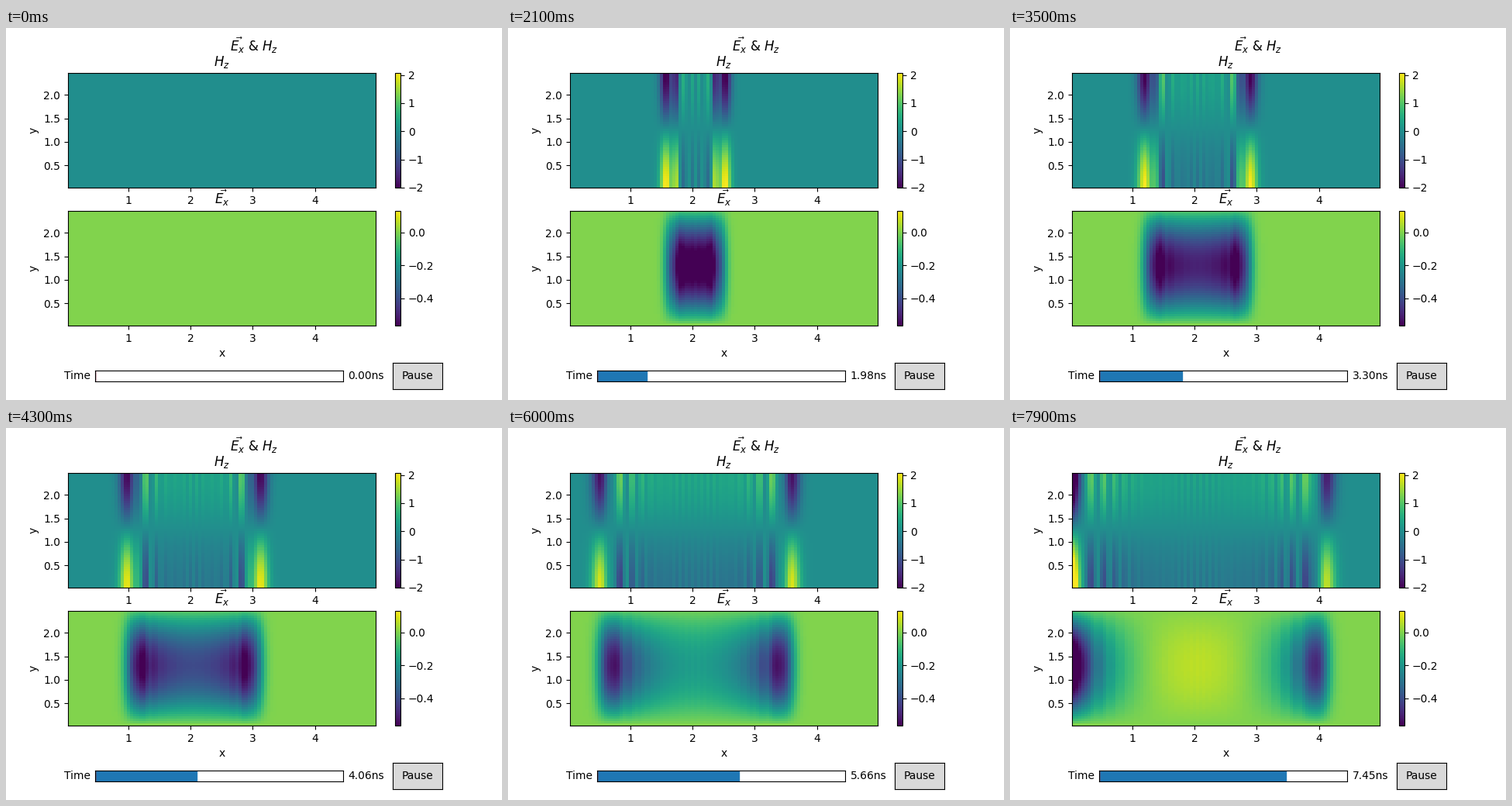
Animation, 640 px wide and 480 px high, one loop 8000 ms. Source, as a matplotlib script:

```python
import matplotlib.pyplot as plt
import numpy as np
from matplotlib.animation import FuncAnimation

C = 299792458.0
NX, NY = 100, 50
CELL = 0.05
COURANT = 0.8 / np.sqrt(2)
DT = COURANT * CELL / C * 1e9  # ns
STEPS, LAST = 80, 105
SRC_COL, SRC_AMP, SRC_END = 40, 1.93, 1.0


def simulate():
    """Yee scheme between conducting walls, driven by a 1 ns pulse."""
    hz = np.zeros((NX, NY))
    ex = np.zeros((NX, NY + 1))
    ey = np.zeros((NX + 1, NY))
    mode = np.cos(np.pi * (np.arange(NY) + 0.5) / NY)
    h_log, e_log = [hz.copy()], [ex.copy()]
    for n in range(STEPS - 1):
        ex[:, 1:-1] += COURANT * np.diff(hz, axis=1)
        ey[1:-1] -= COURANT * np.diff(hz, axis=0)
        hz += COURANT * (np.diff(ex, axis=1) - np.diff(ey, axis=0))
        if n * DT < SRC_END:
            hz[SRC_COL] += SRC_AMP * mode
        h_log.append(hz.copy())
        e_log.append(ex.copy())
    return h_log, e_log


def visible(field):
    return field[:NX - 1, :NY - 1].T


h_log, e_log = simulate()
x = (np.arange(NX) + 0.5) * CELL
y = (np.arange(NY) + 0.5) * CELL

fig, axes = plt.subplots(2, 1, figsize=(6.4, 4.8), dpi=100)
fig.subplots_adjust(bottom=0.2)
fig.suptitle(r"$\vec{E_x}$ & $H_z$")


def panel(ax, field, title, vmin, vmax):
    mesh = ax.pcolormesh(x, y, visible(field), cmap="viridis",
                         vmin=vmin, vmax=vmax, shading="flat")
    fig.colorbar(mesh, ax=ax)
    ax.set_title(title)
    ax.set_ylabel("y")
    return mesh


h_mesh = panel(axes[0], h_log[0], "$H_z$", -2.005, 2.085)
e_mesh = panel(axes[1], e_log[0], r"$\vec{E_x}$", -0.565, 0.133)
axes[1].set_xlabel("x")


def widget(rect, color):
    ax = fig.add_axes(rect, facecolor=color)
    ax.set_xticks([])
    ax.set_yticks([])
    return ax


track = widget([0.18, 0.05, 0.5, 0.03], "white")
bar = track.axvspan(0, 0, color="C0")
track.axvline(0, color="r", lw=1)
track.set_xlim(0, LAST * DT)
track.text(-0.02, 0.5, "Time", transform=track.transAxes,
           ha="right", va="center")
clock = track.text(1.02, 0.5, "0.00ns", transform=track.transAxes,
                   ha="left", va="center")

button = widget([0.78, 0.03, 0.1, 0.07], "0.85")
button.text(0.5, 0.5, "Pause", transform=button.transAxes,
            ha="center", va="center")


def update(n):
    h_mesh.set_array(visible(h_log[n]))
    e_mesh.set_array(visible(e_log[n]))
    bar.set_width(n * DT)
    clock.set_text(f"{n * DT:.2f}ns")
    return h_mesh, e_mesh, bar, clock


anim = FuncAnimation(fig, update, frames=STEPS, interval=100,
                     repeat=True, repeat_delay=0, blit=False)
plt.show()
```
